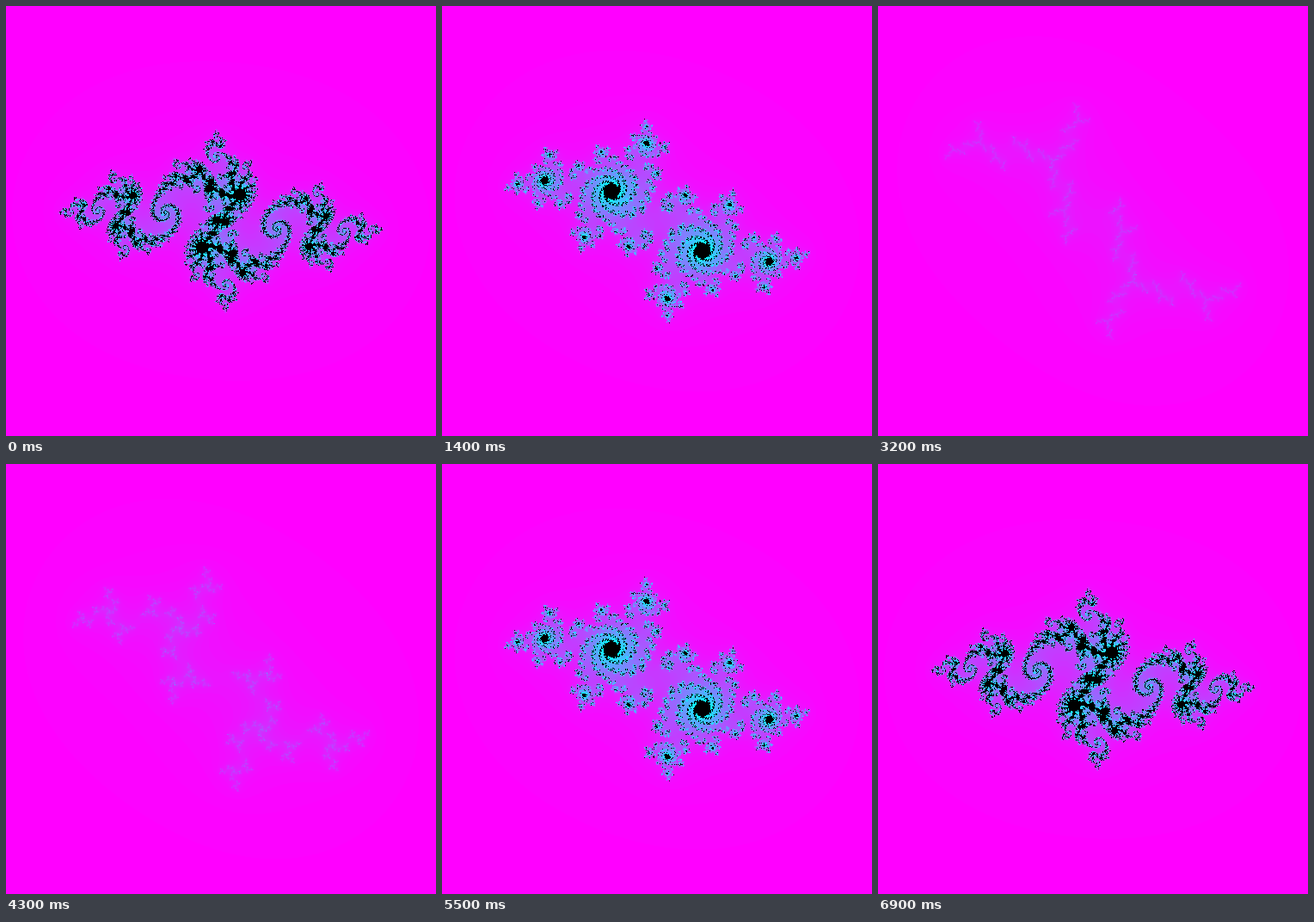
Recreate the animation shown at these times as an HTML page with a canvas. Size 500 by 500 pixels, loop 7 s.

```html
<!DOCTYPE html>
<html lang="en">
<head>
<meta charset="utf-8">
<title>Julia set morph</title>
<style>
  html, body { margin: 0; width: 100%; height: 100%; overflow: hidden; background: #f0f; }
  canvas { display: block; width: 500px; height: 500px; }
</style>
</head>
<body>
<canvas id="stage" width="500" height="500"></canvas>
<script>
const SIZE = 500;
const STEP_MS = 100;
const STEPS = 35;          // poses on the way out; the way back mirrors them
const MAX_ITER = 100;
const ESCAPE = 3;
const FROM = { re: -0.79, im: 0.15 };
const TO = { re: -0.162, im: 1.04 };

const ctx = document.getElementById('stage').getContext('2d');
const cache = [];

// Packed ABGR colours: magenta to cyan by escape time, black inside.
const palette = new Uint32Array(MAX_ITER + 1);
for (let n = 0; n < MAX_ITER; n++) {
  const g = Math.round(255 * n / MAX_ITER);
  palette[n] = ((255 << 24) | (255 << 16) | (g << 8) | (255 - g)) >>> 0;
}
palette[MAX_ITER] = 0xff000000;

const mix = (a, b, f) => a + (b - a) * f;
const axis = i => -2 + 4 * i / (SIZE - 1);

function escapeTime(x, y, re, im) {
  for (let n = 0; n < MAX_ITER; n++) {
    const nx = x * x - y * y + re;
    y = 2 * x * y + im;
    x = nx;
    if (x * x + y * y > ESCAPE * ESCAPE) return n;
  }
  return MAX_ITER;
}

function render(step) {
  const f = step / (STEPS - 1);
  const re = mix(FROM.re, TO.re, f);
  const im = mix(FROM.im, TO.im, f);
  const image = ctx.createImageData(SIZE, SIZE);
  const pixels = new Uint32Array(image.data.buffer);
  const last = pixels.length - 1;
  // The set is symmetric under z -> -z, so half the rows are enough.
  for (let row = 0, p = 0; row < SIZE / 2; row++) {
    const y = -axis(row);
    for (let col = 0; col < SIZE; col++, p++) {
      pixels[p] = pixels[last - p] = palette[escapeTime(axis(col), y, re, im)];
    }
  }
  return image;
}

let shown = -1;
function draw(time) {
  const tick = Math.floor(Math.max(0, time) / STEP_MS) % (2 * STEPS);
  const step = tick < STEPS ? tick : 2 * STEPS - 1 - tick;
  if (step !== shown) {
    cache[step] = cache[step] || render(step);
    ctx.putImageData(cache[step], 0, 0);
    shown = step;
  }
}

const start = performance.now();
function loop() {
  draw(performance.now() - start);
  requestAnimationFrame(loop);
}
loop();
</script>
</body>
</html>
```
